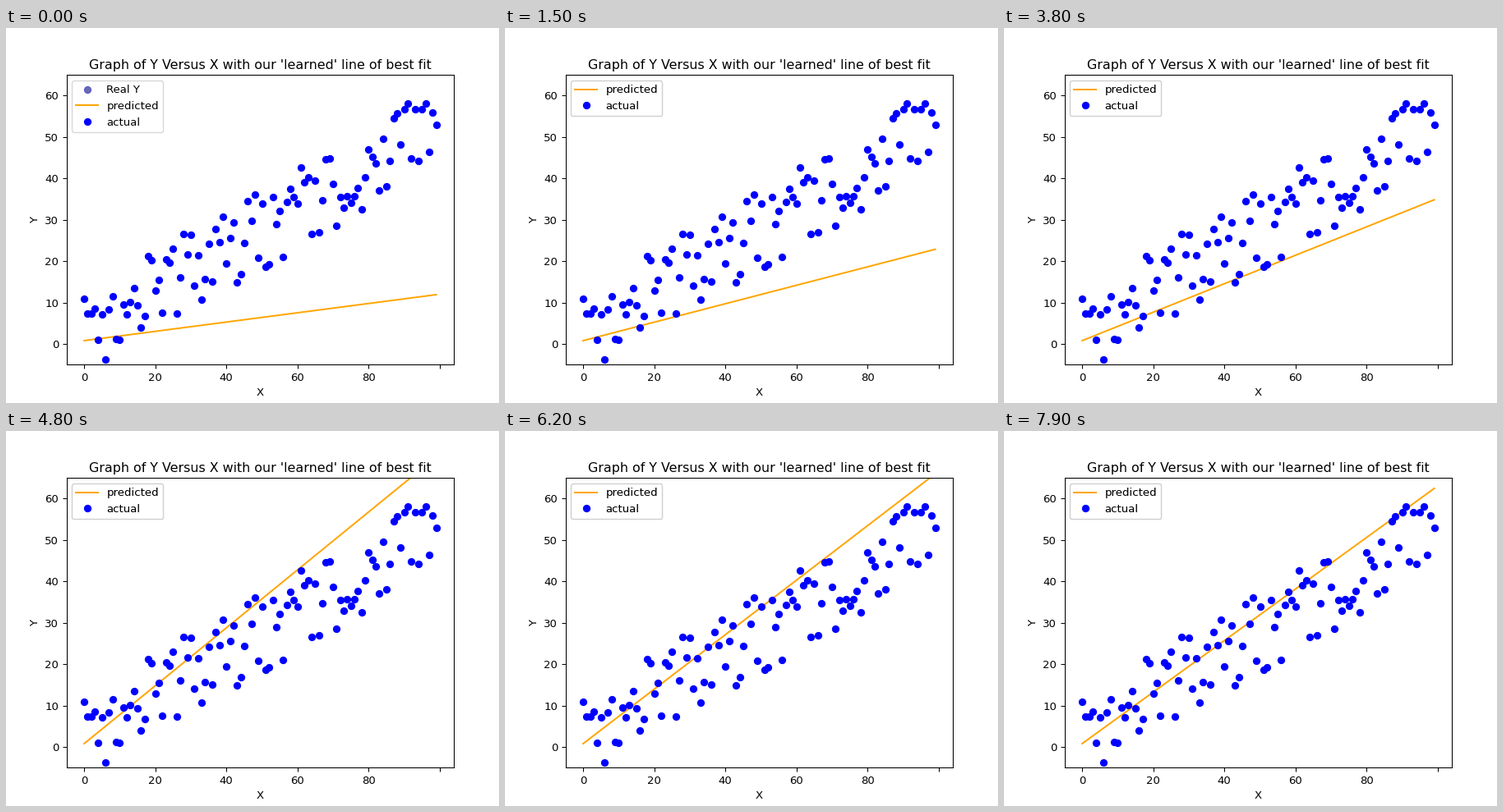
These frames come from a looping animation (600x457 px, 8 s). A matplotlib script:

```python
import matplotlib.pyplot as plt
import numpy as np
from matplotlib.animation import FuncAnimation

W, H, DPI = 600, 457, 95
FRAMES, INTERVAL = 80, 100

# Gradient descent with a slightly too large learning rate: the slope
# overshoots on every step and closes in on the best fit from both sides.
BEST, START, BIAS = 0.54, 0.1121, 0.8
FACTOR = -0.9705
STEPS_PER_FRAME, PHASE = 0.695, 0.35

x = np.arange(100)
y = np.array([
    10.9, 7.3, 7.3, 8.6, 0.9, 7.1, -3.7, 8.4, 11.5, 1.2,
    0.9, 9.6, 7.1, 10.1, 13.5, 9.4, 3.9, 6.7, 21.3, 20.2,
    12.8, 15.4, 7.6, 20.4, 19.6, 23.0, 7.3, 16.0, 26.6, 21.7,
    26.4, 14.1, 21.5, 10.7, 15.6, 24.1, 15.1, 27.7, 24.5, 30.8,
    19.4, 25.6, 29.4, 14.9, 16.8, 24.4, 34.4, 29.8, 36.0, 20.9,
    33.8, 18.6, 19.2, 35.5, 28.9, 32.1, 21.1, 34.2, 37.4, 35.5,
    33.8, 42.7, 39.1, 40.2, 26.6, 39.5, 27.0, 34.7, 44.5, 44.8,
    38.7, 28.5, 35.5, 32.9, 35.7, 34.0, 35.7, 37.7, 32.5, 40.2,
    46.9, 45.2, 43.6, 37.0, 49.5, 38.0, 44.2, 54.4, 55.6, 48.2,
    56.7, 58.0, 44.8, 56.7, 44.2, 56.7, 58.0, 46.3, 55.9, 53.0,
])

plt.rcParams["font.family"] = "DejaVu Sans"
plt.rcParams["toolbar"] = "None"

# The small surplus keeps the pixel size from rounding down.
fig = plt.figure(figsize=((W + 0.001) / DPI, (H + 0.001) / DPI), dpi=DPI,
                 facecolor="white")
ax = fig.add_axes([73.5 / W, 46.5 / H, 471.5 / W, 353 / H])
ax.set_xlim(-5.0, 103.95)
ax.set_ylim(-5.05, 64.9)
ax.set_xticks(range(0, 101, 20), ["0", "20", "40", "60", "80", ""])
ax.set_yticks(range(0, 61, 10))
ax.set_xlabel("X")
ax.set_ylabel("Y")
ax.set_title("Graph of Y Versus X with our 'learned' line of best fit")

real, = ax.plot([], [], "o", mfc="#6a6aaa", mec="#5c5cd0", label="Real Y")
line, = ax.plot(x, BIAS + START * x, color="orange", label="predicted")
dots, = ax.plot(x, y, "bo", label="actual")


def add_legend(handles):
    legend = ax.legend(handles=handles, loc="upper left")
    ax.add_artist(legend)
    return legend


first_legend = add_legend([real, line, dots])
main_legend = add_legend([line, dots])


def update(i):
    step = int(STEPS_PER_FRAME * i + PHASE)
    slope = BEST + (START - BEST) * FACTOR ** step
    line.set_ydata(BIAS + slope * x)
    first_legend.set_visible(step == 0)
    main_legend.set_visible(step > 0)
    return line, first_legend, main_legend


anim = FuncAnimation(fig, update, frames=FRAMES, interval=INTERVAL,
                     repeat=True, repeat_delay=0, blit=False)
plt.show()
```
